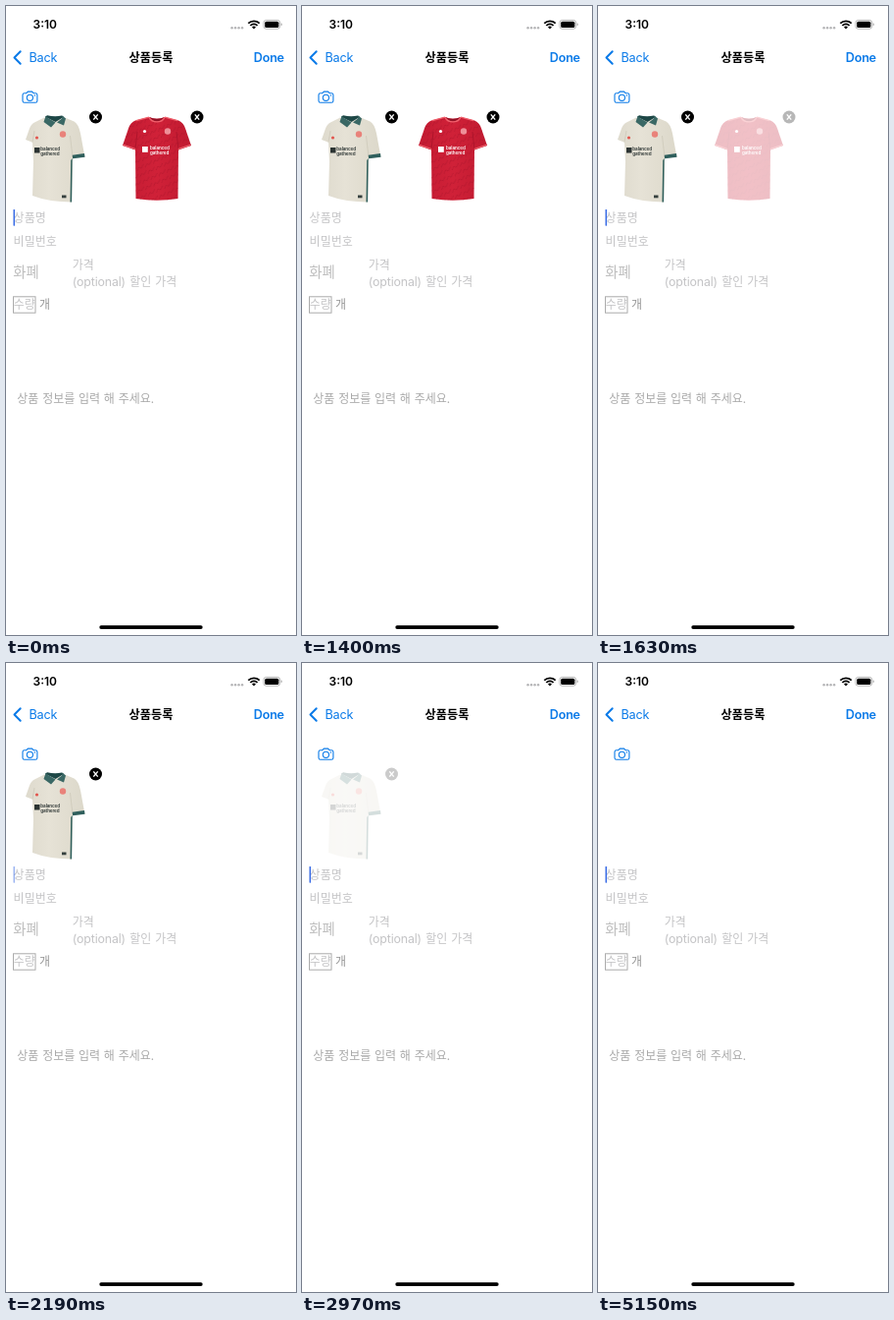
Write an HTML page that moves like this. It is 296x640 px and loops after 5250 ms.

```html
<!DOCTYPE html>
<html lang="ko">
<head>
<meta charset="utf-8">
<title>상품등록</title>
<style>
  html, body { margin: 0; width: 100%; height: 100%; overflow: hidden; background: #fff; }
  svg { display: block; width: 296px; height: 640px; }
  text { font-family: Inter, Roboto, sans-serif; }
  .ko { font: 12px "Noto Sans CJK KR", "Noto Sans CJK", "Noto Sans CJK JP", sans-serif; }
  .hint { fill: #c4c4c6; }
  .blue { fill: #0a7ae8; }
  .line { fill: none; stroke: #0a7ae8; stroke-linecap: round; stroke-linejoin: round; }
  .print { font-size: 4.6px; font-weight: 600; letter-spacing: -.1px; }
</style>
</head>
<body>
<svg viewBox="0 0 296 640">
  <defs>
    <g id="badge">
      <circle r="6.5"/>
      <path d="M-2.2-2.6 2.2 2.6M2.2-2.6-2.2 2.6" stroke="#fff" stroke-width="1.4"/>
    </g>
    <path id="body" d="M146 113 132 116.500Q127 118.500 125 124.500L119 142 132 146.500 132.500 196Q154 199.500 175.500 196L176 146.500 189 142 183 124.500Q181 118.500 176 116.500L162 113Q154 116.500 146 113z"/>
    <linearGradient id="cream">
      <stop offset="0" stop-color="#dedacd"/>
      <stop offset=".4" stop-color="#e6e2d6"/>
      <stop offset="1" stop-color="#dcd8ca"/>
    </linearGradient>
    <linearGradient id="red">
      <stop offset="0" stop-color="#c31b32"/>
      <stop offset=".5" stop-color="#d02138"/>
      <stop offset="1" stop-color="#c01a30"/>
    </linearGradient>
    <pattern id="weave" width="9" height="7" patternUnits="userSpaceOnUse" patternTransform="rotate(-24)">
      <path d="M0 5 3 2 5 4 9 1" fill="none" stroke="#a9142a" stroke-width=".8" opacity=".6"/>
    </pattern>
  </defs>

  <!-- status bar -->
  <text x="27.5" y="23.3" font-size="12" font-weight="600">3:10</text>
  <g fill="#b4b4b6">
    <circle cx="230.6" cy="22.3" r="1.2"/><circle cx="234.1" cy="22.3" r="1.2"/>
    <circle cx="237.6" cy="22.3" r="1.2"/><circle cx="241.1" cy="22.3" r="1.2"/>
  </g>
  <g fill="none" stroke="#000" stroke-width="1.8">
    <path d="M247.3 17.7a8 8 0 0 1 11.4 0"/>
    <path d="M249.4 20a5 5 0 0 1 7.2 0"/>
  </g>
  <path d="M251 21.4a2.9 2.9 0 0 1 4 0L253 23.5z"/>
  <rect x="262.9" y="14.4" width="16.800" height="8.800" rx="2.600" fill="none" stroke="#a5a5a5" stroke-width=".8"/>
  <rect x="264.2" y="15.7" width="14.200" height="6.200" rx="1.500"/>
  <path d="M280.6 17.3q1.2.4 1.2 1.5t-1.2 1.5z" fill="#a5a5a5"/>

  <!-- navigation bar -->
  <path class="line" d="M14.7 46.3 8.5 52.5l6.2 6.2" stroke-width="2"/>
  <text class="blue" x="23.5" y="57" font-size="12.7" letter-spacing="-.25">Back</text>
  <text class="ko" x="148" y="57" text-anchor="middle" style="font-size:12.2px;font-weight:700">상품등록</text>
  <text class="blue" x="283.8" y="57" text-anchor="end" font-size="12.7" font-weight="600" letter-spacing="-.3">Done</text>

  <!-- camera button -->
  <g class="line" stroke-width="1.1">
    <path d="M18.8 88.7h2.1l1.3-1.6h4.5l1.3 1.6h2.1q1.8 0 1.8 1.8v6q0 1.8-1.8 1.8H18.8q-1.8 0-1.8-1.8v-6q0-1.8 1.8-1.8z"/>
    <circle cx="24.4" cy="93.3" r="3.1"/>
  </g>
  <circle class="blue" cx="29.4" cy="91" r=".7"/>

  <!-- form -->
  <g class="hint">
    <text class="ko" x="7.600" y="220">상품명</text>
    <text class="ko" x="7.600" y="244">비밀번호</text>
    <text class="ko" x="7.200" y="276.200" style="font-size:14.4px" fill="#bdbdbd">화폐</text>
    <text class="ko" x="67.800" y="268">가격</text>
    <text x="67.800" y="284.500" font-size="12.4" letter-spacing="-.15">(optional)</text>
    <text class="ko" x="126.200" y="284.500" word-spacing=".7">할인 가격</text>
    <text class="ko" x="7.800" y="308">수량</text>
  </g>
  <rect x="7.5" y="295.8" width="22.5" height="16.4" fill="none" stroke="#ababab"/>
  <text class="ko" x="34" y="308" fill="#969696">개</text>
  <text class="ko" x="11.300" y="403.600" fill="#a9a9a9" word-spacing=".4">상품 정보를 입력 해 주세요.</text>

  <!-- cream shirt -->
  <g id="first">
    <path d="M39 113.500 29 118.500Q25 120.500 23.500 126L20 136l7 2.800 1 19.700-1 34.500Q44 199.500 67 199.500L68 155l12.400-1.500-4.400-24Q74 120 69.500 117.500L60 113.500Q49 119 39 113.500z" fill="url(#cream)"/>
    <path d="M27 138.500 29 127M68 154 65.500 132" stroke="#cbc6b7" stroke-width=".7"/>
    <path d="M40 112.800 42 111.300Q50 113 57 111.500L59 113 50.500 118z" fill="#1d4746"/>
    <path d="M40.500 112 38.500 118 46 123.500 50.500 118.500 43 114zM57.500 111.500 61 114.500 59 121.500 52 118.500 57 114.500z" fill="#3a6865"/>
    <path d="m67.700 151.700 12.300-1.700.5 3.700-12.400 1.500zM66.200 157l1.500-2-.6 44.400-1.600.1z" fill="#2f5f5c"/>
    <circle cx="31.500" cy="134" r="1.600" fill="#e2574f"/>
    <circle cx="58" cy="130.500" r="3.200" fill="#e9827a"/>
    <rect x="29" y="144" width="5.500" height="5.500" fill="#2c3433"/>
    <g class="print" fill="#2c3433"><text x="35.300" y="147.300">balanced</text><text x="35.300" y="151.800">gathered</text></g>
    <rect x="57" y="192.500" width="4.500" height="2.800" fill="#36413f"/>
    <use href="#badge" x="91.500" y="113"/>
  </g>

  <!-- red shirt -->
  <g id="second">
    <use href="#body" fill="url(#red)"/>
    <use href="#body" fill="url(#weave)"/>
    <path d="M132 146 134 128M176 146 174 128" stroke="#a9142a" stroke-width=".8"/>
    <path d="M146.500 113.300q7.500 3 15 0-2 4-7.500 4t-7.500-4z" fill="#931226"/>
    <path d="M146 113.400q2.300 4.500 8 4.500t8-4.500M146 113.200 133 116.600M162 113.200 175 116.600M119.700 141.300l12.500 4.200M188.300 141.300l-12.500 4.200" fill="none" stroke="#f0606c" stroke-width="1.300"/>
    <circle cx="141.500" cy="127.500" r="1.600" fill="#fff"/>
    <circle cx="165" cy="127.500" r="3.200" fill="#ee8f98"/>
    <rect x="139" y="143" width="5.800" height="5.800" fill="#fff"/>
    <g class="print" fill="#fff"><text x="147" y="145.800">balanced</text><text x="147" y="150.600">gathered</text></g>
    <use href="#badge" x="195" y="113"/>
  </g>

  <rect id="caret" x="7.500" y="207" width="1.600" height="16.700" rx=".6" fill="#3c6ee6"/>
  <rect x="95.300" y="630.200" width="105.400" height="3.700" rx="1.850"/>
</svg>
<script>
  const LOOP = 5250;

  // opacity steps: [start in ms, opacity]
  const steps = {
    caret: [[0, 1], [380, .5], [500, 0], [1040, .5], [1160, 1], [1400, 0], [1510, 1], [1740, 0],
            [2190, .5], [2430, .4], [2550, 0], [2730, 1], [3470, .5], [3590, 0],
            [4130, 1], [4490, .5], [4610, 0], [5150, 1]],
    second: [[0, 1], [1510, .65], [1630, .28], [1740, 0]],
    first: [[0, 1], [2850, .6], [2970, .2], [3110, 0]]
  };

  const start = performance.now();

  function draw() {
    const t = (performance.now() - start) % LOOP;
    for (const id in steps) {
      const [, opacity] = steps[id].findLast(([from]) => from <= t);
      document.getElementById(id).setAttribute('opacity', opacity);
    }
    requestAnimationFrame(draw);
  }
  draw();
</script>
</body>
</html>
```
